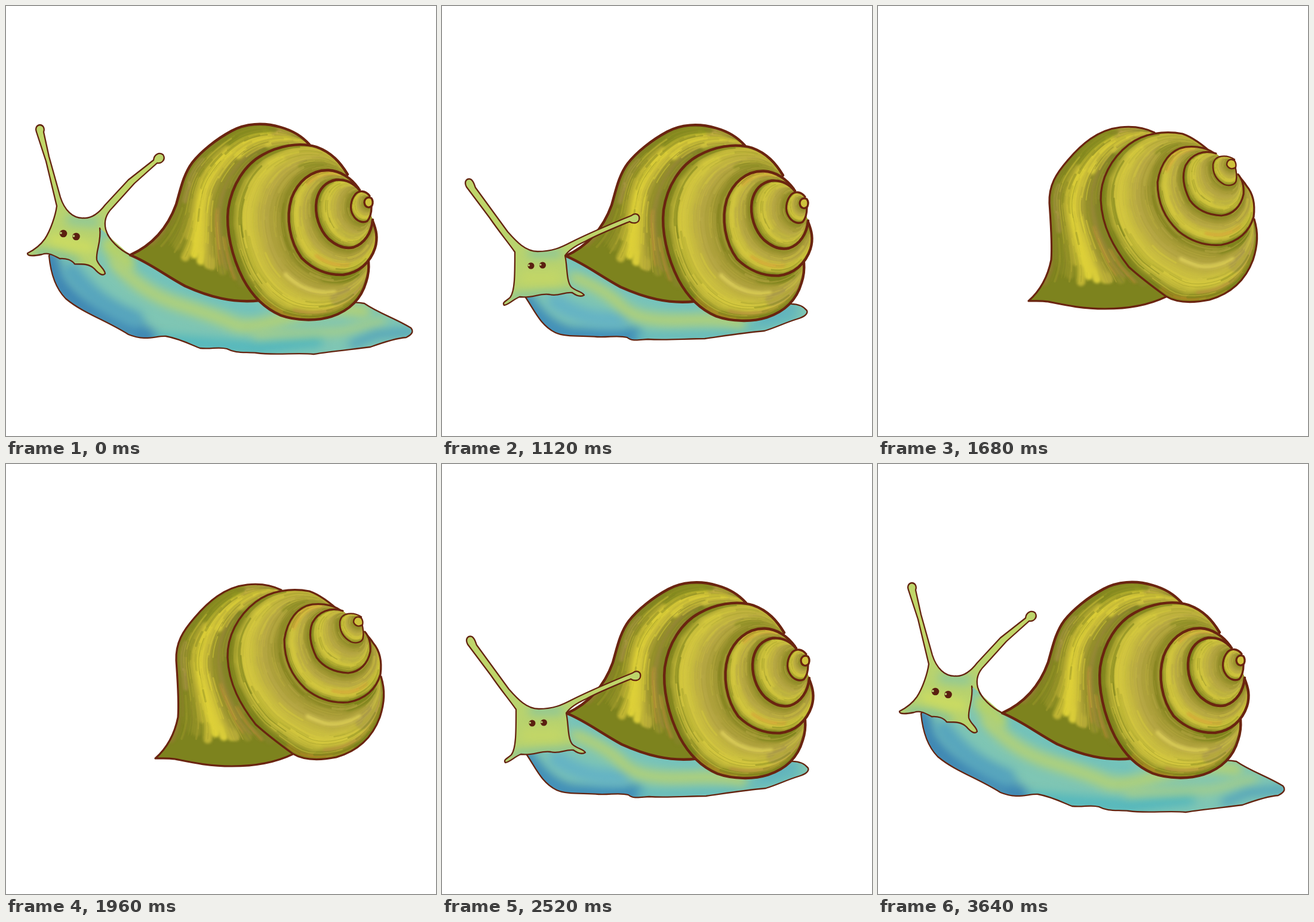
These frames come from a looping animation (720x720 px, 3920 ms). An HTML page with a canvas:

```html
<!DOCTYPE html>
<html lang="en">
<head>
<meta charset="utf-8">
<title>Snail</title>
<style>
html, body { margin: 0; width: 100%; height: 100%; overflow: hidden; background: #fff; }
canvas { display: block; width: 100vmin; height: 100vmin; }
</style>
</head>
<body>
<canvas id="stage" width="720" height="720"></canvas>
<script>
const INK = '#642410';
const STEP = 280;

// Each shell: the spiral ridges from outside in, the lower edge,
// and the stretch of the second ridge that borders the outer band.
const openShell = {
  line: 4.4,
  border: [.11, .64],
  ridges: [
    'M508 232C494 216 478 208 460 203C430 194 400 197 378 209C352 223 327 243 312 262C297 282 292 308 285 332C273 365 250 398 208 417',
    'M572 282C560 262 545 245 520 236C490 227 455 235 430 249C400 265 378 300 372 340C368 375 378 420 397 457C412 485 432 506 460 518C485 527 520 528 545 520C575 510 595 490 603 462C607 450 608 440 607 428',
    'M590 305C578 288 560 276 540 275C510 274 488 295 478 322C468 355 475 395 495 422C515 442 540 451 565 450C590 447 610 430 618 405C623 388 620 375 614 360',
    'M592 308C580 294 565 290 553 291C535 294 524 307 520 325C516 350 525 375 540 390C555 403 570 407 582 404C600 398 612 380 614 358',
    'M609 318C602 309 592 308 585 315C577 325 575 340 581 350C587 361 598 364 605 360C611 353 612 345 612 336',
    'M612 322C606 318 600 323 600 329C601 338 609 339 613 334C615 329 614 325 612 322'
  ],
  floor: 'M208 417C240 430 265 450 300 469C340 487 380 498 425 493'
};
const shutShell = {
  line: 3.2,
  border: [.16, .65],
  ridges: [
    'M463 212C445 203 425 201 406 203C368 207 340 232 318 258C298 281 286 300 287 330C289 360 292 395 290 425C284 455 270 478 252 494',
    'M563 250C548 236 530 221 510 214C480 208 445 213 420 232C390 255 372 290 373 325C375 370 395 405 420 437C440 455 460 470 482 486C500 497 525 498 555 492C590 482 615 460 628 425C636 400 637 380 630 357',
    'M567 250C555 238 535 234 515 236C490 240 473 262 468 295C468 330 480 355 503 377C525 395 550 402 575 400C603 395 622 378 629 353C632 330 628 314 617 301C612 293 607 288 602 283',
    'M566 247C545 240 525 248 515 267C508 285 512 305 522 325C535 343 555 350 575 351C595 349 608 335 612 315C613 300 610 290 603 282',
    'M597 257C585 249 564 248 561 265C560 280 567 292 580 299C588 302 600 300 600 290C601 285 600 277 598 268',
    'M597 259C590 254 584 259 584 266C587 273 594 274 599 270C600 266 599 262 597 259'
  ],
  floor: 'M252 494C260 494 272 493 285 495C310 500 340 507 380 507C420 507 455 500 482 487'
};

// Colour across a band, from its outer ridge to the next one.
const outerRamp = ['#8d7f2c', '#7f8420', '#8b8b24', '#b3a932', '#e0d338', '#d6c83a', '#aa9f36', '#8f8d26', '#99893a', '#76801a'];
const innerRamp = ['#6f7c15', '#838520', '#bcb338', '#d6ca3f', '#cdc140', '#c0b340', '#b8a946', '#aea13c', '#9f9632', '#858420'];

// Wider touches: band, across, from, to, width, colour.
const touches = [
  [0, .25, .02, .16, 12, '#c4a458'], [0, .75, .05, .2, 14, '#d2c544'],
  [0, .62, .12, .35, 12, '#dccf3c'], [0, .2, .16, .36, 12, '#7f871c'],
  [0, .75, .6, .85, 5, '#c2903b'], [0, .88, .7, .9, 4, '#bf8a35'],
  [0, .12, .5, .68, 8, '#ae954e'], [1, .05, .64, .8, 4, '#d18c2a'],
  [1, .4, .8, .97, 22, '#a8984a'], [1, .15, .72, .92, 6, '#b8913c'],
  [1, .3, .03, .2, 12, '#b9ac3c'], [1, .7, .05, .2, 12, '#8f9026'],
  [1, .6, .6, .76, 7, '#e0d25c'], [1, .9, .68, .85, 14, '#7a831a'],
  [2, .25, .1, .25, 7, '#dfa03a'], [2, .35, .6, .75, 5, '#d79a36'],
  [2, .6, .75, .9, 9, '#a8993c'], [3, .4, .6, .85, 9, '#b8ae40']
];

const openBody = 'M208 417C188 405 170 390 166 372L100 380L72 418C75 450 85 475 100 490C130 515 165 525 205 550C235 562 250 552 268 553C295 558 315 570 325 573C345 575 355 570 370 574C385 582 400 579 420 581C450 585 490 580 515 583C545 578 580 575 610 571C635 562 655 556 670 555C680 550 683 545 678 539C650 522 625 515 600 498C590 496 580 496 575 498L400 450Z';
const halfBody = 'M208 417L160 430L140 488C155 510 165 535 190 547C205 554 230 552 260 554C280 555 295 551 310 555C318 562 330 559 345 558C375 560 410 557 440 557C475 552 505 547 540 544C560 538 575 530 595 524C608 520 613 515 611 510C603 500 592 498 580 499L400 450Z';
const openHead = 'M157 372C160 395 150 410 152 425C155 435 165 440 166 448C162 453 155 448 148 440C140 432 130 432 115 432C110 425 100 422 90 423C80 418 72 412 60 416C50 418 35 420 36 414C48 408 58 400 65 390C75 375 83 350 85 335L67 260L51 211C48 203 53 199 57 199C63 200 65 205 63 211L72 252L91 320C98 342 112 356 130 355C144 356 156 346 166 333L205 291L247 258C248 249 256 244 263 249C268 257 261 264 253 263L215 297L178 338C166 350 164 362 167 374C172 392 190 408 208 417';
const halfHead = 'M206 418C210 435 208 460 216 470C224 478 235 478 238 484C232 488 225 485 218 480C205 478 195 487 180 483C165 480 150 490 130 487C118 492 112 500 104 501C100 496 108 494 114 488C122 478 122 450 122 412C110 395 95 377 80 355L41 303C36 293 42 288 48 290C54 294 54 300 56 304L110 378C125 395 140 411 160 411C185 411 200 404 215 396C245 381 285 364 317 351C324 345 332 349 330 358C328 364 320 365 314 361C285 373 258 384 240 394C222 402 212 409 206 418';

// Soft brush marks: colour, width, path.
const openBodyMarks = [
  ['#4088b4', 34, 'M72 425Q85 485 150 512T240 560'],
  ['#57a5bd', 30, 'M110 445Q150 500 215 525'],
  ['#54b7bd', 22, 'M260 560L420 573L520 560'],
  ['#70c1bc', 18, 'M215 425Q290 482 420 508'],
  ['#b6d268', 30, 'M175 400L200 430'],
  ['#afd07a', 22, 'M185 430Q225 480 290 500T380 532T470 522T600 512'],
  ['#a5cd88', 14, 'M420 550L560 545L630 528'],
  ['#4b9dbc', 12, 'M580 567L620 550L680 545']
];
const halfBodyMarks = [
  ['#4390b8', 32, 'M135 490Q175 545 215 552L320 553'],
  ['#65b3c4', 28, 'M190 495Q240 530 300 525'],
  ['#62b9bd', 14, 'M330 555L470 550L590 520'],
  ['#74c2bd', 20, 'M220 428Q300 485 420 505'],
  ['#b3d074', 18, 'M222 455Q275 475 300 502T400 526T500 532'],
  ['#55abc0', 12, 'M535 525L590 505']
];
const openHeadMarks = [
  ['#8cc79b', 16, 'M108 358L150 362'],
  ['#76bda4', 12, 'M52 414L88 417L118 428'],
  ['#cddc60', 18, 'M80 390L140 405'],
  ['#d0de5e', 7, 'M57 204L80 300M256 254L190 320']
];
const halfHeadMarks = [
  ['#88c59d', 14, 'M150 414L195 414'],
  ['#80c1a0', 13, 'M120 488L180 482L222 480'],
  ['#c3d666', 20, 'M140 455L190 455'],
  ['#cddc62', 6, 'M46 297L100 372M323 355L240 385']
];

function layer() {
  const canvas = document.createElement('canvas');
  canvas.width = canvas.height = 720;
  const g = canvas.getContext('2d');
  g.lineCap = g.lineJoin = 'round';
  return g;
}

function seeded(seed) {
  return () => (seed = (seed * 16807) % 2147483647) / 2147483647;
}

function sample(d, from = 0, to = 1) {
  const path = document.createElementNS('http://www.w3.org/2000/svg', 'path');
  path.setAttribute('d', d);
  const length = path.getTotalLength();
  return Array.from({ length: 61 }, (_, i) =>
    path.getPointAtLength(length * (from + (to - from) * i / 60)));
}

function mix(ramp, v) {
  const x = Math.max(0, Math.min(.999, v)) * (ramp.length - 1);
  const i = Math.floor(x);
  const part = (hex, k) => parseInt(hex.substr(1 + 2 * k, 2), 16);
  const rgb = [0, 1, 2].map(k =>
    Math.round(part(ramp[i], k) + (part(ramp[i + 1], k) - part(ramp[i], k)) * (x - i)));
  return `rgb(${rgb})`;
}

function softFill(g, d, base, marks) {
  const shape = new Path2D(d);
  g.save();
  g.clip(shape);
  g.fillStyle = base;
  g.fill(shape);
  g.filter = 'blur(8px)';
  for (const [color, width, path] of marks) {
    g.strokeStyle = color;
    g.lineWidth = width;
    g.stroke(new Path2D(path));
  }
  g.restore();
  g.strokeStyle = INK;
  g.lineWidth = 2.3;
  g.stroke(shape);
}

// A brush mark running along a band between two ridges.
function sweep(g, a, b, v, from, to) {
  g.beginPath();
  for (let i = 0; i <= 16; i++) {
    const k = Math.round(60 * (from + (to - from) * i / 16));
    g.lineTo(a[k].x + (b[k].x - a[k].x) * v, a[k].y + (b[k].y - a[k].y) * v);
  }
  g.stroke();
}

function paintBand(g, a, b, band) {
  const rnd = seeded(91 + band * 37);
  const ramp = band ? innerRamp : outerRamp;
  const scale = [1, 1, .6, .55, .3][band];
  const end = band ? 1 : .9;
  g.filter = 'blur(2px)';
  g.lineWidth = 15 * scale;
  for (let v = 0; v <= 1; v += .04) {
    g.strokeStyle = mix(ramp, v);
    sweep(g, a, b, v, 0, end - (band ? 0 : rnd() * .12));
  }
  g.globalAlpha = .8;
  for (const [n, v, from, to, width, color] of touches) {
    if (n !== band) continue;
    g.strokeStyle = color;
    g.lineWidth = width;
    sweep(g, a, b, v, from, to);
  }
  g.filter = 'none';
  for (let i = 0; i < 240 * scale; i++) {
    const v = rnd(), from = rnd() * .85;
    const to = Math.min(end, from + .05 + rnd() * .14);
    g.globalAlpha = .15 + rnd() * .4;
    g.lineWidth = (.8 + rnd() * rnd() * 5) * Math.sqrt(scale);
    g.strokeStyle = mix(ramp, v + (rnd() - .5) * .45);
    sweep(g, a, b, v, from, to);
  }
}

function paintShell(g, { line, border, ridges, floor }) {
  const curves = ridges.map(d => sample(d));
  ridges.forEach((d, n) => {
    const edge = n ? d : d + floor.replace(/^M\d+ \d+/, '');
    const shape = new Path2D(edge);
    g.save();
    g.clip(shape);
    g.fillStyle = n === 5 ? '#cfc23c' : '#7d831e';
    g.fill(shape);
    if (n < 5) paintBand(g, curves[n], n ? curves[n + 1] : sample(ridges[1], ...border), n);
    g.restore();
    g.strokeStyle = '#6a2410';
    g.lineWidth = n > 3 ? line * .75 : line;
    g.stroke(shape);
  });
}

function paintEyes(g, eyes, r) {
  for (const [x, y] of eyes) {
    g.fillStyle = '#5a1f10';
    g.beginPath();
    g.arc(x, y, r, 0, 7);
    g.fill();
    g.fillStyle = '#bcd077';
    g.beginPath();
    g.arc(x - r * .65, y - r * .15, r * .3, 0, 7);
    g.fill();
  }
}

function paintSnail(body, bodyMarks, head, headMarks, eyes, r, dx, dy) {
  const g = layer();
  softFill(g, body, '#7fc6b4', bodyMarks);
  g.save();
  g.translate(dx, dy);
  paintShell(g, openShell);
  g.restore();
  softFill(g, head, '#b9d36e', headMarks);
  paintEyes(g, eyes, r);
  return g.canvas;
}

const full = paintSnail(openBody, openBodyMarks, openHead, openHeadMarks, [[96, 381], [117.5, 386]], 6.3, 0, 0);
const half = paintSnail(halfBody, halfBodyMarks, halfHead, halfHeadMarks, [[149, 435], [168.5, 434]], 5.5, -1, 1.5);
const shutLayer = layer();
paintShell(shutLayer, shutShell);
const shut = shutLayer.canvas;

const still = Array(4).fill([full, 0, 0]);
const poses = [
  ...still, [half, 0, 0],
  [shut, -2, 1], [shut, 0, 0], [shut, -2, -1], [shut, -2, 0],
  [half, 2, -1], ...still
];

const stage = document.getElementById('stage').getContext('2d');
function draw() {
  const [picture, x, y] = poses[Math.floor(performance.now() / STEP) % poses.length];
  stage.fillStyle = '#fff';
  stage.fillRect(0, 0, 720, 720);
  stage.drawImage(picture, x, y);
  requestAnimationFrame(draw);
}
draw();
</script>
</body>
</html>
```
